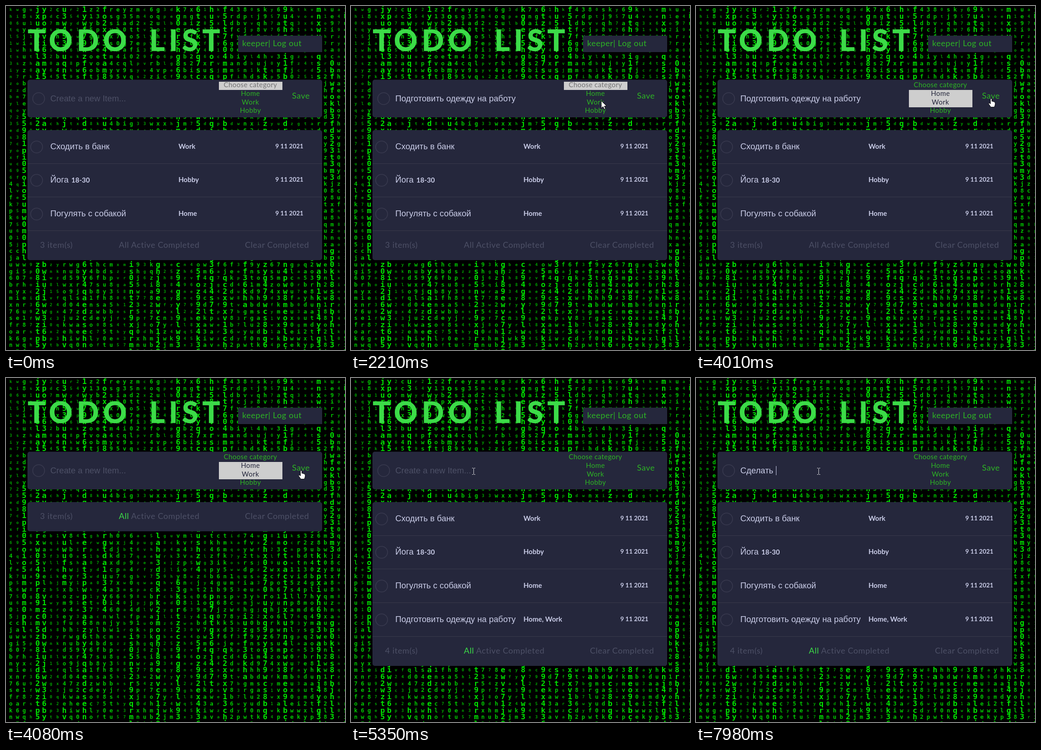
Recreate the animation shown at these times as an HTML page with a canvas. Size 742 px wide and 754 px high, loop 8 s.

```html
<!DOCTYPE html>
<html lang="en">
<head>
<meta charset="utf-8">
<title>Todo list</title>
<style>
  html, body { margin: 0; width: 100%; height: 100%; overflow: hidden; background: #000; }
  canvas, svg { position: absolute; left: 0; top: 0; }
  rect:not([rx]) { shape-rendering: crispEdges; }
  text { font-family: Lato, sans-serif; white-space: pre; }
  .title { font-size: 63px; font-weight: 700; letter-spacing: 10px; word-spacing: 15px;
    fill: #3cdb48; stroke: #3cdb48; stroke-width: 1.6; }
  .big { font-size: 18px; letter-spacing: .55px; }
  .opt { font-size: 15px; letter-spacing: .4px; text-anchor: middle; }
  .body { font: 18.4px "Liberation Sans", Arial, sans-serif; }
  .tag { font: 700 15px Lato, sans-serif; }
  .date { font: 700 13.5px Lato, sans-serif; }
  .panel { fill: #25273c; }
  .green { fill: #2db424; }
  .light { fill: #cacde8; }
  .dim { fill: #4d5066; }
  .ring { fill: none; stroke: #393a4f; stroke-width: 1.6; }
  .line { fill: #393a4b; }
</style>
</head>
<body>
<canvas id="rain" width="742" height="754"></canvas>
<svg width="742" height="754" viewBox="0 0 742 754">
  <text class="title" x="48" y="98">TODO LIST</text>
  <rect class="panel" x="508" y="65" width="184" height="36"/>
  <text class="big green" x="517" y="88">keeper|</text>
  <text class="big green" x="584" y="88">Log out</text>

  <rect class="panel" x="47" y="161.5" width="645" height="82.5" rx="5"/>
  <circle class="ring" cx="71.5" cy="203" r="13"/>
  <text class="body dim" id="hint" x="97" y="209">Create a new Item...</text>
  <text class="body light" id="entry" x="97" y="209"></text>
  <rect class="light" id="caret" y="193" width="1" height="20"/>
  <g id="options"></g>
  <text class="big green" x="626" y="203">Save</text>

  <rect class="panel" id="list" x="47" y="272" width="645" rx="5"/>
  <g id="rows"></g>
  <g id="footer" class="big dim">
    <text id="count" x="74.5" y="37"></text>
    <text x="247" y="37"><tspan id="all">All</tspan> Active Completed</text>
    <text x="523" y="37">Clear Completed</text>
  </g>

  <g id="pointer">
    <circle id="click" r="11" fill="#e8e84a" fill-opacity=".6"/>
    <path id="arrow" d="M0 0V16L3.8 12.5L6.4 18.4L9 17.2L6.4 11.5H11.5Z" fill="#fff" stroke="#000" stroke-width=".9"/>
    <path id="beam" d="M-3.5 -6.5H-1L0 -5.5L1 -6.5H3.5M0 -5.5V6.5M-3.5 7.5H-1L0 6.5L1 7.5H3.5" fill="none" stroke="#d8d8dc"/>
    <path id="hand" d="M-1.5 1Q0 -1.5 1.5 1V6Q3 5 4 6.6Q6 6 6.7 7.6Q8.6 7.2 8.8 9.4V13Q8 15.5 7 18.5H-.8Q-2 15.8 -5.4 11.8Q-6 9 -3.4 10L-1.5 11.6Z" fill="#fff" stroke="#000" stroke-width=".9"/>
  </g>
</svg>
<script>
const LOOP = 8000, ROW = 73.75, TOP = 272;
const $ = id => document.getElementById(id);
const show = (id, on) => $(id).style.display = on ? '' : 'none';
const rowTop = i => Math.floor(TOP + i * ROW);

function drawRain() {
  const ctx = $('rain').getContext('2d');
  const chars = 'abcdefghijklmnopqrstuvwxyz0123456789';
  const bright = [2, 4, 5, 8, 11, 14, 18, 22, 25, 28, 30, 32, 35, 38, 41, 46, 48];
  const looks = [[9, '#00a400'], [12.5, '#00c800'], [16.5, '#00e400']];
  let seed = 7;
  const rnd = () => (seed = (seed * 16807) % 2147483647) / 2147483647;
  ctx.fillRect(0, 0, 742, 754);
  ctx.textAlign = 'center';
  ctx.textBaseline = 'middle';
  for (let col = 0; col < 51; col++) {
    const base = bright.includes(col) ? 1 : 0;
    let left = 0, look;
    for (let row = 0; row < 52; row++) {
      if (left-- <= 0) {
        left = 6 + rnd() * 16;
        look = looks[base + (rnd() < (base ? .75 : .5) ? 1 : 0)];
      }
      ctx.font = `bold ${look[0]}px "DejaVu Sans Mono", monospace`;
      ctx.fillStyle = look[1];
      ctx.fillText(chars[Math.floor(rnd() * 36)], 10.5 + col * 14.65, 9 + row * 14.7);
    }
  }
}

const options = ['Choose category', 'Home', 'Work', 'Hobby'];
$('options').innerHTML = options.map((name, i) => `
  <rect x="466" y="${165.7 + i * 18.75}" width="139" height="18.75"/>
  <text class="opt" x="535" y="${Math.round(178 + i * 18.75)}">${name}</text>`).join('');

const tasks = [
  ['Сходить в банк', 'Work'],
  ['Йога <tspan x="143" class="tag">18-30</tspan>', 'Hobby'],
  ['Погулять с собакой', 'Home'],
  ['Подготовить одежду на работу', 'Home, Work']
];
$('rows').innerHTML = tasks.map(([name, tag], i) => `
  <g transform="translate(0 ${rowTop(i)})">
    <circle class="ring" cx="67" cy="37" r="13"/>
    <text class="body light" x="97" y="42">${name}</text>
    <text class="tag light" x="377.5" y="41">${tag}</text>
    <text class="date light" x="589.5" y="40">9 11 2021</text>
    <rect class="line" x="47" y="73" width="645" height="1"/>
  </g>`).join('');

const typed = [[0, ''], [1590, tasks[3][0]], [4080, ''], [6060, 'С'], [6260, 'Сд'], [6460, 'Сдел'],
  [7450, 'Сдела'], [7780, 'Сделат'], [7880, 'Сделать'], [7980, 'Сделать ']];
const caretOn = [[610, 1260], [1590, 2090], [2660, 2930], [4910, 5350], [5860, 6990], [7450, LOOP]];
const clicks = [[2930, 3000], [3400, 3465], [3940, 4005]];
const counts = [[0, 3], [4080, 0], [4160, 4]];
// time, selected options, background, text colour
const picks = [[0, [0], '#cecece', '#737373'], [2930, [1], '#1e90ff', '#fff'],
  [3400, [1, 2], '#1e90ff', '#fff'], [3940, [1, 2], '#cecece', '#25273c'], [4160, []]];
const path = [[200, 679, 361], [400, 430, 262], [540, 235, 197], [610, 210, 212], [790, 210, 212],
  [860, 210, 214], [1260, 210, 214], [1340, 215, 214], [1790, 215, 214], [2000, 420, 228],
  [2100, 581, 231], [2210, 548, 208], [2400, 537, 192], [2930, 537, 192], [3200, 541, 210],
  [3465, 541, 210], [3800, 646, 203], [4470, 646, 203], [4700, 450, 197], [4910, 268.5, 204]];

const latest = (list, t) => list.filter(e => e[0] <= t).pop();
const inside = (spans, t) => spans.some(([a, b]) => t >= a && t < b);

function place(t) {
  const i = path.findIndex(p => p[0] > t);
  if (i < 0) return path[path.length - 1].slice(1);
  const [a, b] = [path[Math.max(i - 1, 0)], path[i]];
  const k = Math.max(0, (t - a[0]) / (b[0] - a[0] || 1));
  return [a[1] + (b[1] - a[1]) * k, a[2] + (b[2] - a[2]) * k];
}

function render(t) {
  const text = latest(typed, t)[1];
  $('entry').textContent = text;
  show('hint', !text);
  show('caret', inside(caretOn, t));
  $('caret').setAttribute('x', Math.round(97.4 + (text ? $('entry').getComputedTextLength() : 0)));

  const [, chosen, back, ink] = latest(picks, t);
  options.forEach((_, i) => {
    const on = chosen.includes(i), nodes = $('options').children;
    nodes[i * 2].setAttribute('fill', on ? back : 'none');
    nodes[i * 2 + 1].setAttribute('fill', on ? ink : '#2db424');
  });

  const n = latest(counts, t)[1];
  [...$('rows').children].forEach((row, i) => row.style.display = i < n ? '' : 'none');
  $('list').setAttribute('height', rowTop(n) - TOP + 64);
  $('footer').setAttribute('transform', `translate(0 ${rowTop(n)})`);
  $('count').textContent = (n || 3) + ' item(s)';
  $('all').setAttribute('fill', t >= 4080 ? '#3cdb48' : '#4d5066');

  const [x, y] = place(t);
  const beam = x > 85 && x < 440 && y > 163 && y < 244;
  const hand = x > 624 && y > 180 && y < 215;
  show('pointer', t >= 200);
  show('beam', beam);
  show('hand', hand);
  show('arrow', !beam && !hand);
  show('click', inside(clicks, t));
  $('pointer').setAttribute('transform', `translate(${x} ${y})`);
}

function tick() {
  render(performance.now() % LOOP);
  requestAnimationFrame(tick);
}

drawRain();
tick();
</script>
</body>
</html>
```
